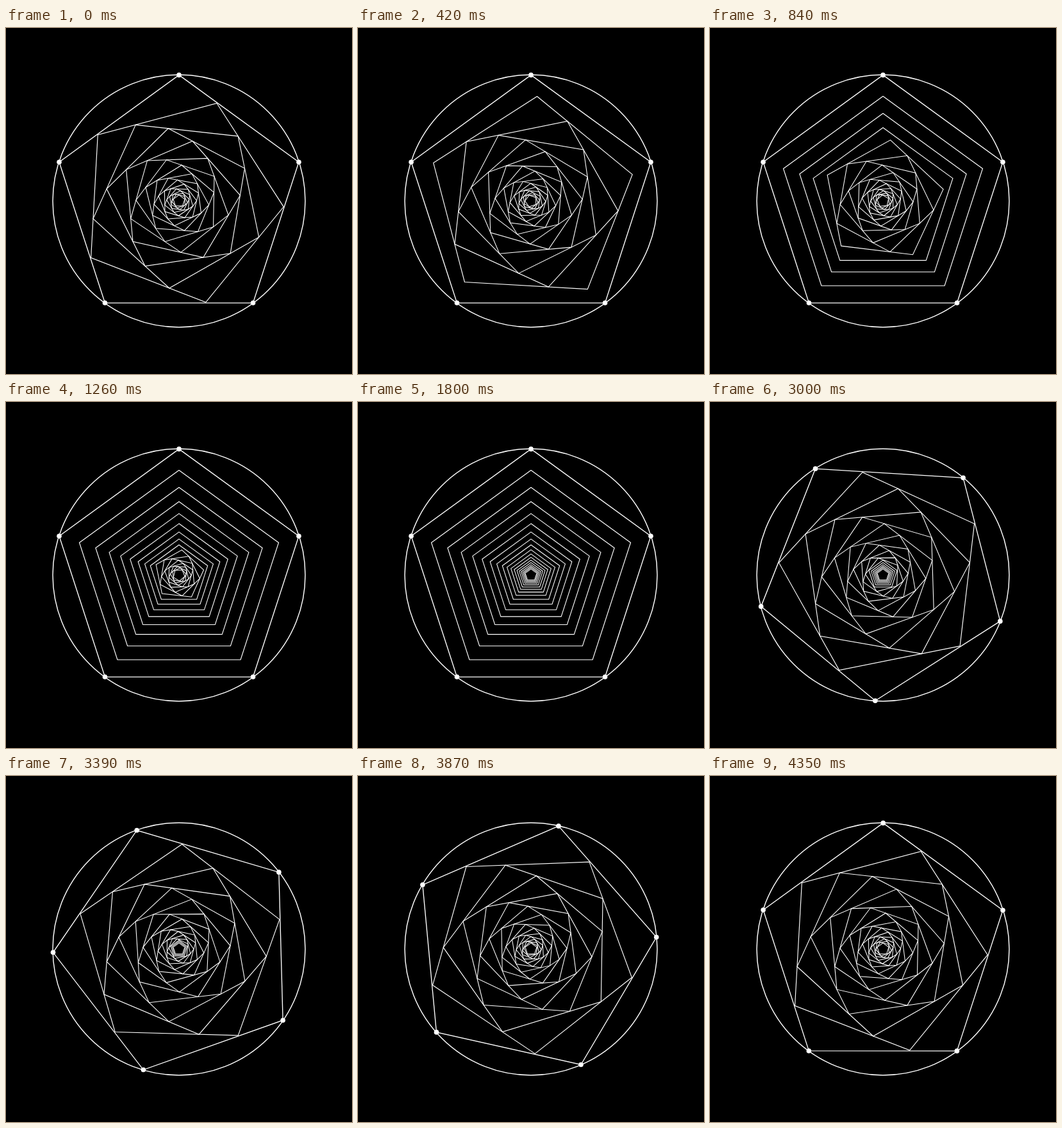
Recreate the animation shown at these times as an HTML page with a canvas. Size 540x540 px, loop 4680 ms.

```html
<!DOCTYPE html>
<html lang="en">
<head>
<meta charset="utf-8">
<title>Nested pentagons</title>
<style>
  html, body { margin: 0; width: 100%; height: 100%; overflow: hidden; background: #000; }
  canvas { display: block; width: 540px; height: 540px; }
</style>
</head>
<body>
<canvas id="stage" width="540" height="540"></canvas>
<script>
const ctx = document.getElementById('stage').getContext('2d');
const CENTER = 270;
const RING = 197;
const LEVELS = 17;
const STEP = 2 * Math.PI / LEVELS;
const SHRINK = Math.cos(Math.PI / 5) / Math.cos(Math.PI / 5 - STEP);
const TICK = 30;
const TICKS = 156;

// y of the curve (0,0) (a,0) (b,1) (1,1) at a given x
function ease(x, a, b) {
  if (x <= 0) return 0;
  if (x >= 1) return 1;
  let lo = 0, hi = 1;
  for (let i = 0; i < 40; i++) {
    const t = (lo + hi) / 2, u = 1 - t;
    if (3 * u * u * t * a + 3 * u * t * t * b + t * t * t < x) lo = t;
    else hi = t;
  }
  return lo * lo * (3 - 2 * lo);
}

// Unwind from the outside in, pause, then wind up again by turning the outside.
function angleAt(tick) {
  if (tick <= 70) {
    const done = tick >= 60 ? LEVELS
      : Math.min(LEVELS, 2 * LEVELS * ease(tick / 136, 0.396, 0.44));
    return k => STEP * Math.max(0, k - done);
  }
  const done = tick >= 146 ? LEVELS
    : Math.max(0, 2 * LEVELS * ease((tick - 10) / 136.2, 0.43, 0.42) - LEVELS);
  return k => -STEP * Math.max(0, done - k);
}

function corners(radius, angle) {
  return Array.from({ length: 5 }, (_, i) => {
    const a = angle + i * 2 * Math.PI / 5;
    return [CENTER + radius * Math.sin(a), CENTER - radius * Math.cos(a)];
  });
}

function strokePentagon(points, width) {
  ctx.lineWidth = width;
  ctx.beginPath();
  points.forEach(([x, y]) => ctx.lineTo(x, y));
  ctx.closePath();
  ctx.stroke();
}

function disc(x, y, r) {
  ctx.beginPath();
  ctx.arc(x, y, r, 0, 2 * Math.PI);
}

function draw(tick) {
  const angle = angleAt(tick);
  ctx.fillStyle = '#000';
  ctx.fillRect(0, 0, 540, 540);
  ctx.strokeStyle = ctx.fillStyle = '#fff';

  ctx.lineWidth = 1.45;
  disc(CENTER, CENTER, RING);
  ctx.stroke();

  for (let k = LEVELS; k > 0; k--) {
    const radius = 163.5 * SHRINK ** (k - 1);
    strokePentagon(corners(radius, angle(k)), 1 + 0.2 * radius / RING);
  }

  const outer = corners(196.6, angle(0));
  strokePentagon(outer, 1.35);
  for (const [x, y] of outer) {
    disc(x, y, 3.8);
    ctx.fill();
  }
}

const start = performance.now();
function loop() {
  draw(Math.floor((performance.now() - start) / TICK) % TICKS);
  requestAnimationFrame(loop);
}
loop();
</script>
</body>
</html>
```
